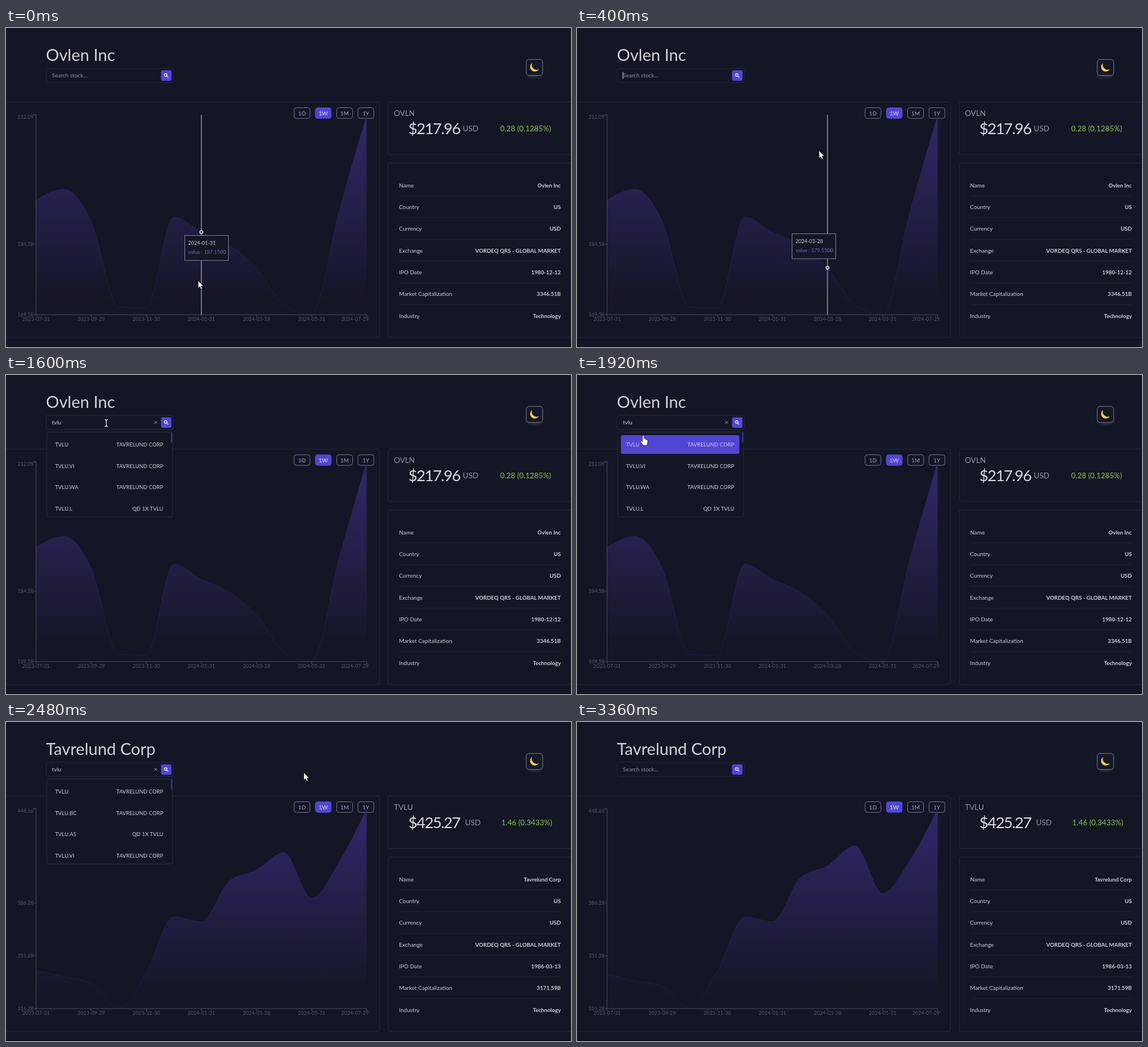
These frames come from a looping animation (997 px wide and 562 px high, 3.44 s). An HTML page:

```html
<!DOCTYPE html>
<html lang="en">
<head>
<meta charset="utf-8">
<title>Stock dashboard</title>
<style>
  html, body { margin: 0; width: 100%; height: 100%; overflow: hidden; background: #131624; }
  svg { display: block; width: 997px; height: 562px; font: 10px Lato, sans-serif; fill: #cdced6; }
  .panel { fill: none; stroke: #262a39; }
  .big { font-size: 29px; fill: #d2d3da; }
  .price { font-size: 27.5px; letter-spacing: -1.6px; fill: #d8d9e0; }
  .mid { font-size: 13.5px; fill: #9496a1; }
  .tick { font-size: 9px; fill: #555865; }
  .axis { stroke: #4d505d; fill: none; }
  .val { font-weight: 700; font-size: 9.7px; text-anchor: end; }
  .row { stroke: #1f2332; }
  .list text { font-size: 9.5px; }
  .end { text-anchor: end; }
  .mc { text-anchor: middle; }
</style>
</head>
<body>
<svg viewBox="0 0 997 562">
  <defs>
    <linearGradient id="fade" gradientUnits="userSpaceOnUse" x1="0" y1="153" x2="0" y2="505">
      <stop offset=".03" stop-color="#342c76" stop-opacity=".85"/>
      <stop offset=".95" stop-color="#342c76" stop-opacity="0"/>
    </linearGradient>
    <radialGradient id="glow">
      <stop offset="0" stop-color="#2a2e3d"/>
      <stop offset="1" stop-color="#2a2e3d" stop-opacity="0"/>
    </radialGradient>
  </defs>
  <rect width="997" height="562" fill="#131624"/>
  <rect y="561" width="997" height="1" fill="#05060a"/>

  <text id="title" class="big" x="70.5" y="58"></text>
  <rect class="panel" x="71" y="71" width="224" height="25" rx="3"/>
  <text id="query" x="81" y="87"></text>
  <path id="caret" d="M0 77.500V89.500" stroke="#e6e7ec"/>
  <path id="clear" d="M261.500 81l5 5m0-5l-5 5" stroke="#9a9ca7" fill="none"/>
  <rect x="273.500" y="74.500" width="18.500" height="18.500" rx="3" fill="#5246d6"/>
  <g fill="none" stroke="#f2f2fa" stroke-width="1.300"><circle cx="281.800" cy="82.800" r="2.300"/><path d="M283.600 84.600l2.600 2.600"/></g>

  <ellipse cx="932.500" cy="85" rx="18" ry="6" fill="url(#glow)"/>
  <rect x="918" y="55.300" width="29" height="28.400" rx="5" fill="#151828" stroke="#7f828f"/>
  <path d="M928.500 61.500A8.300 8.300 0 1 0 940.300 72.600A8.600 8.600 0 0 1 928.500 61.500Z" fill="#f2d04c"/>

  <rect class="panel" x="-6" y="130.500" width="665" height="414.500" rx="3"/>
  <rect class="panel" x="674.500" y="130.500" width="330" height="92.500" rx="3"/>
  <rect class="panel" x="674.500" y="238" width="330" height="307" rx="3"/>

  <g id="ranges"></g>
  <path id="area" fill="url(#fade)"/>
  <path id="line" fill="none" stroke="#312c78" stroke-opacity=".4"/>
  <path class="axis" d="M48 153H53V505H636.500"/>
  <g id="xticks"></g>
  <g id="yticks"></g>

  <g id="hover">
    <path id="cross" d="M0 153V505" stroke="#cfd0d8"/>
    <circle id="dot" r="2.600" fill="#1b1c38" stroke="#f0f0f5" stroke-width="1.400"/>
    <g id="tip">
      <rect x=".5" y=".5" width="77" height="44" fill="#141725" stroke="#85878f"/>
      <text id="tipDate" x="6.500" y="16.500" font-size="9"></text>
      <text id="tipVal" x="6.500" y="33" font-size="9" fill="#7068c8"></text>
    </g>
  </g>

  <text id="symbol" class="mid" x="684.500" y="155"></text>
  <text id="price" class="price" x="710" y="187"></text>
  <text id="unit" class="mid" y="182">USD</text>
  <text id="change" font-size="13.400" fill="#8fc549" y="182"></text>
  <g id="facts"></g>

  <g id="list" class="list">
    <rect x="72" y="100.500" width="222" height="149.500" rx="3" fill="#131624" stroke="#2b2f3f"/>
    <rect x="291" y="101" width="2.500" height="18" rx="1" fill="#352f8c"/>
    <rect id="pick" x="77.500" y="106" width="209" height="33" rx="3" fill="#5146d3"/>
    <g id="items"></g>
  </g>

  <g id="pointer">
    <path id="arrow" d="M0 0V13.500L3.100 10.600 5.200 15.500 7.500 14.500 5.400 9.700H9.500Z" fill="#fff" stroke="#0a0a10" stroke-width=".8"/>
    <path id="beam" d="M-3-6Q0-6 0-4Q0-6 3-6M0-4.500V4.500M-3 6Q0 6 0 4Q0 6 3 6" fill="none" stroke="#eceef2" stroke-width="1.300"/>
    <path id="hand" d="M-1.500 1.200Q-1.500-.5 0-.5T1.500 1.200V6Q3-.0 4 6.500Q5.500 5.700 6 7Q7.800 6.600 7.800 8.500V12Q7.500 14.500 6.300 17H-.5Q-2.500 13.500-4.500 11Q-5.600 9-4 8.800Q-2.700 8.800-1.500 10.500Z" fill="#fff" stroke="#0a0a10" stroke-width=".7"/>
  </g>
</svg>
<script>
const LOOP = 3440, STEP = 80, TOP = 153, BASE = 505, LEFT = 53, GAP = 583.5 / 12;
const SWITCH = 2160, MORPH = 2185, MORPH_MS = 400;
const $ = id => document.getElementById(id);

const stocks = [
  { name: 'Ovlen Inc', symbol: 'OVLN', price: '$217.96', unitX: 806, change: '0.28 (0.1285%)', changeX: 872,
    ipo: '1980-12-12', cap: '3346.51B', ticks: [212.09, 184.58, 169.58],
    data: [193.95, 196.27, 189.5, 171.15, 170.97, 190.35, 187.15, 184.4, 179.55, 171.6, 169.58, 191.68, 212.09] },
  { name: 'Tavrelund Corp', symbol: 'TVLU', price: '$425.27', unitX: 810, change: '1.46 (0.3433%)', changeX: 874,
    ipo: '1986-03-13', cap: '3171.59B', ticks: [448.66, 386.28, 351.28, 316.28],
    data: [339.22, 334.71, 330.95, 316.28, 341.1, 377, 374, 402.4, 411, 424.2, 392.8, 414.8, 448.66] }
];
const dates = ['2023-07-31', '2023-08-31', '2023-09-29', '2023-10-31', '2023-11-30', '2023-12-29', '2024-01-31',
  '2024-02-29', '2024-03-28', '2024-04-30', '2024-05-31', '2024-06-28', '2024-07-29'];
const CORP = 'TAVRELUND CORP', FUND = 'QD 1X TVLU';
const lists = [
  [['TVLU', CORP], ['TVLU.VI', CORP], ['TVLU.WA', CORP], ['TVLU.L', FUND]],
  [['TVLU', CORP], ['TVLU.BC', CORP], ['TVLU.AS', FUND], ['TVLU.VI', CORP]]
];

// time, x, y, pointer shape
const moves = [
  [0, 339, 445, 'arrow'], [160, 352, 438, 'arrow'], [320, 400, 320, 'arrow'], [400, 427, 216, 'arrow'],
  [480, 500, 176, 'arrow'], [560, 558, 146, 'arrow'], [640, 198, 78, 'beam'], [1520, 198, 78, 'beam'],
  [1760, 135, 98, 'beam'], [1840, 121, 107, 'hand'], [1920, 117, 107, 'hand'], [2080, 113, 118, 'hand'],
  [2320, 113, 118, 'hand'], [2400, 320, 106, 'arrow'], [2480, 525.5, 89, 'arrow'], [2720, 525.5, 89, 'arrow'],
  [2880, 215, 84, 'beam'], [3120, 200, 84, 'none']
];
const tipMoves = [[0, 315, 365], [160, 350, 415], [240, 360, 415], [400, 379, 362], [480, 425, 275]];
const typing = [[0, ''], [880, 't'], [960, 'tv'], [1040, 'tvl'], [1120, 'tvlu'], [3120, 'tvl'], [3200, 'tv'], [3280, '']];

const last = (rows, t) => rows.findLast(r => r[0] <= t);
const show = (id, on) => $(id).setAttribute('visibility', on ? 'inherit' : 'hidden');
const place = (id, x, y) => $(id).setAttribute('transform', `translate(${x} ${y})`);
const text = (x, y, s, cls = '') => `<text class="${cls}" x="${x}" y="${y}">${s}</text>`;
const px = i => LEFT + i * GAP;

function scale(stock) {
  const hi = stock.ticks[0], lo = stock.ticks.at(-1);
  return v => BASE - (v - lo) / (hi - lo) * (BASE - TOP);
}

function along(rows, t) {
  const a = last(rows, t), b = rows[rows.indexOf(a) + 1];
  if (!b) return [a[1], a[2]];
  const k = (t - a[0]) / (b[0] - a[0]);
  return [a[1] + (b[1] - a[1]) * k, a[2] + (b[2] - a[2]) * k];
}

// cubic-bezier(.25, .1, .25, 1)
function ease(x) {
  if (x <= 0) return 0;
  if (x >= 1) return 1;
  const bez = (u, p, q) => 3 * u * (1 - u) ** 2 * p + 3 * u * u * (1 - u) * q + u ** 3;
  let lo = 0, hi = 1;
  for (let i = 0; i < 24; i++) {
    const mid = (lo + hi) / 2;
    bez(mid, .25, .25) < x ? lo = mid : hi = mid;
  }
  return bez(lo, .1, 1);
}

// monotone cubic through evenly spaced points
function curve(ys) {
  const n = ys.length - 1, s = ys.slice(1).map((y, i) => (y - ys[i]) / GAP), m = [];
  for (let i = 1; i < n; i++) {
    const a = s[i - 1], b = s[i];
    m[i] = (Math.sign(a) + Math.sign(b)) * Math.min(Math.abs(a), Math.abs(b), Math.abs(a + b) / 4);
  }
  m[0] = (3 * s[0] - m[1]) / 2;
  m[n] = (3 * s[n - 1] - m[n - 1]) / 2;
  let d = `M${px(0)} ${ys[0]}`;
  for (let i = 0; i < n; i++) {
    const h = GAP / 3;
    d += `C${px(i) + h} ${ys[i] + m[i] * h} ${px(i + 1) - h} ${ys[i + 1] - m[i + 1] * h} ${px(i + 1)} ${ys[i + 1]}`;
  }
  return d;
}

stocks.forEach(s => s.ys = s.data.map(scale(s)));

$('ranges').innerHTML = ['1D', '1W', '1M', '1Y'].map((s, i) => {
  const x = 508.3 + i * 37.6, on = i === 1;
  return `<rect x="${x}" y="140.5" width="28" height="18.7" rx="4" fill="${on ? '#5246d6' : 'none'}" stroke="${on ? '#5246d6' : '#777a92'}"/>
    <text class="mc" x="${x + 14}" y="153.5" fill="${on ? '#e4e3fa' : '#a3a2d2'}">${s}</text>`;
}).join('');

$('xticks').innerHTML = dates.map((d, i) => i % 2 ? '' :
  `<path class="axis" d="M${px(i)} 505v4"/>` + (i === 12 ? text(640, 516, d, 'tick end') : text(px(i), 516, d, 'tick mc'))).join('');

function showStock(s) {
  const y = scale(s);
  $('title').textContent = s.name;
  $('symbol').textContent = s.symbol;
  $('price').textContent = s.price;
  $('change').textContent = s.change;
  $('unit').setAttribute('x', s.unitX);
  $('change').setAttribute('x', s.changeX);
  $('yticks').innerHTML = s.ticks.map((v, i) =>
    `<path class="axis" d="M49 ${y(v)}h4"/>` + text(48.5, y(v) + (i ? 3.2 : 7.2), v.toFixed(2), 'tick end')).join('');
  const facts = [['Name', s.name], ['Country', 'US'], ['Currency', 'USD'], ['Exchange', 'VORDEQ QRS - GLOBAL MARKET'],
    ['IPO Date', s.ipo], ['Market Capitalization', s.cap], ['Industry', 'Technology']];
  $('facts').innerHTML = facts.map(([k, v], i) => {
    const base = 280.6 + i * 38.35;
    return text(693.5, base, k) + text(979, base, v, 'val') +
      (i < 6 ? `<path class="row" d="M694 ${base + 15}H979"/>` : '');
  }).join('');
}

function showList(rows) {
  $('items').innerHTML = rows.map(([a, b], i) =>
    text(86.5, 126 + i * 37.6, a) + text(277.5, 126 + i * 37.6, b, 'end')).join('');
}

function drawHover(t, x) {
  const on = t < 560;
  show('hover', on);
  if (!on) return;
  const i = Math.round((x - LEFT) / GAP);
  place('cross', px(i), 0);
  place('dot', px(i), stocks[0].ys[i]);
  place('tip', ...along(tipMoves, t));
  $('tipDate').textContent = dates[i];
  $('tipVal').textContent = `value : ${stocks[0].data[i].toFixed(4)}`;
}

let shownStock, shownList;
function draw(t) {
  const stock = stocks[+(t >= SWITCH)], rows = lists[+(t >= 2400)];
  if (stock !== shownStock) showStock(shownStock = stock);
  if (rows !== shownList) showList(shownList = rows);

  const k = ease((t - MORPH) / MORPH_MS);
  const d = curve(stocks[0].ys.map((y, i) => y + (stocks[1].ys[i] - y) * k));
  $('line').setAttribute('d', d);
  $('area').setAttribute('d', `${d}V${BASE}H${LEFT}Z`);

  const [x, y] = along(moves, t), kind = last(moves, t)[3];
  place('pointer', x, y);
  ['arrow', 'beam', 'hand'].forEach(s => show(s, s === kind));
  drawHover(t, x);

  const typed = last(typing, t)[1], q = $('query');
  q.textContent = typed || 'Search stock...';
  q.setAttribute('fill', typed ? '#cdced6' : '#8f919c');
  show('clear', typed);
  show('caret', (t >= 240 && t < 560) || (t >= 880 && t < 1200) || (t >= 3120 && t < 3280));
  place('caret', typed ? 81.5 + q.getComputedTextLength() : 81, 0);

  show('list', t >= 1440 && t < 3200);
  show('pick', kind === 'hand');
}

// the screen refreshes in 80 ms steps
function tick() {
  draw(Math.floor(performance.now() % LOOP / STEP) * STEP);
  requestAnimationFrame(tick);
}
tick();
</script>
</body>
</html>
```
